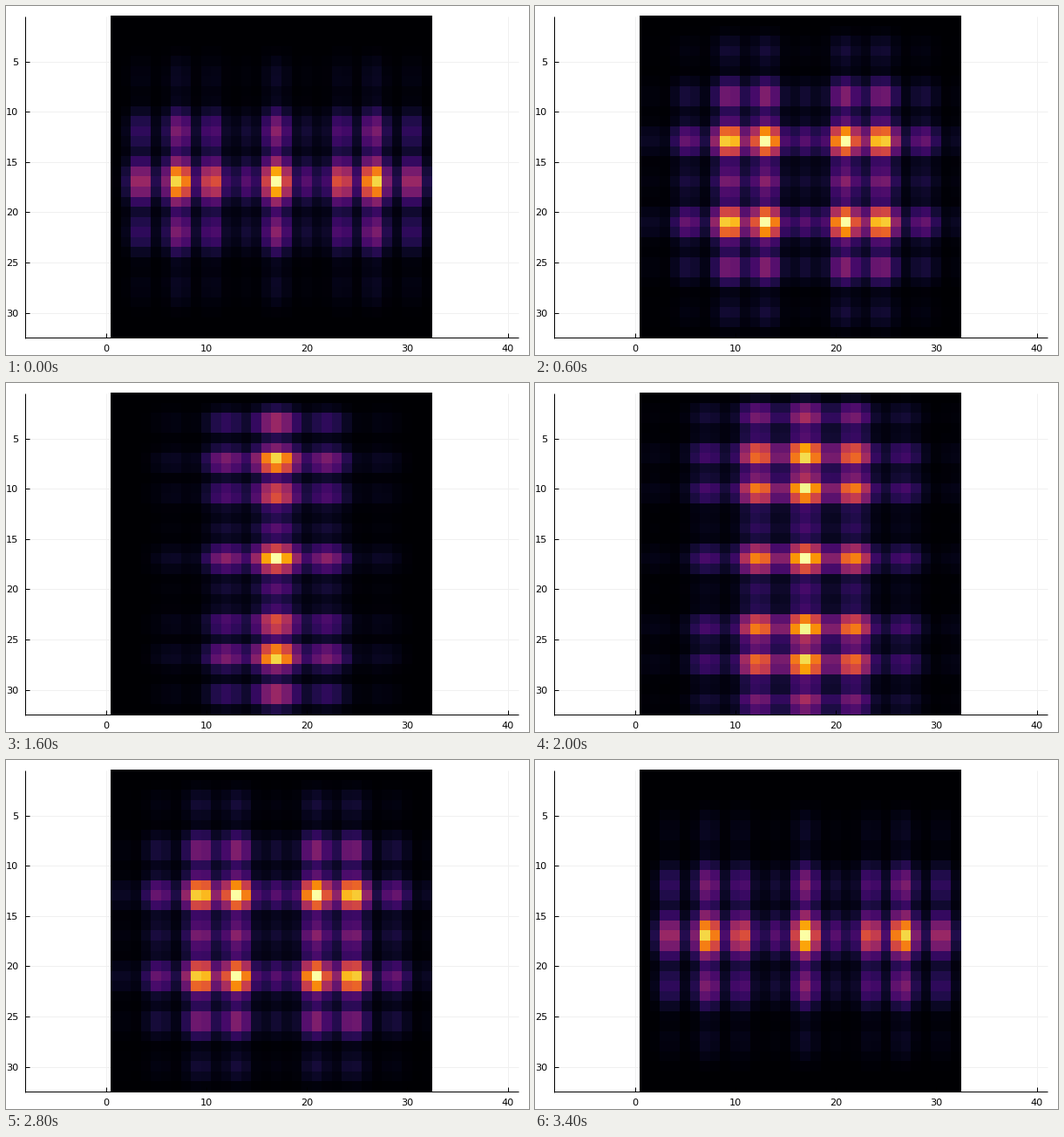
Animation, 600 px wide and 400 px high, one loop 3.6 s. Source, as a matplotlib script:

```python
import numpy as np
import matplotlib.pyplot as plt
from matplotlib.animation import FuncAnimation

W, H, DPI = 600, 400, 100
N, STEPS = 32, 9
CELL = 11.52
LEFT, RIGHT, TOP, BOTTOM = 22, 588, 12, 380
ZERO_X, ZERO_Y = 114.7, 6.0

# Lobes of the 1D fringe profile at four stages: each row follows one lobe.
STAGES = [0, 3, 5, 8]
CENTRES = [[0, 0, 0, 0],
           [3.0, 3.9, 4.1, 5.0],
           [6.4, 7.55, 8.5, 10.4],
           [9.7, 11.7, 13.0, 16.0],
           [13.5, 15.5, 17.5, 21.0]]
HEIGHTS = [[-1, -0.25, 0.37, 1],
           [0.25, -1, -1, -0.38],
           [0.65, 0.95, 0.38, 0.07],
           [-0.95, -0.30, -0.10, 0],
           [0.48, 0.07, 0, 0]]
WIDTHS = [1.3, 1.55, 1.65, 2.1]

offset = np.abs(np.arange(N) - N // 2)


def profile(stage):
    width = np.interp(stage, STAGES, WIDTHS)
    power = np.zeros(N)
    for centres, heights in zip(CENTRES, HEIGHTS):
        c = np.interp(stage, STAGES, centres)
        h = np.interp(stage, STAGES, heights)
        power += (h * np.exp(-((offset - c) / width) ** 2)) ** 2
    return np.sqrt(power)


def pattern(stage):
    field = np.outer(profile(STAGES[-1] - stage), profile(stage))
    return field / field.max()


fig = plt.figure(figsize=(W / DPI, H / DPI), dpi=DPI, facecolor="white")
ax = fig.add_axes([0, 0, 1, 1])


def line(xs, ys, color="black", width=1.0, z=5):
    ax.plot(xs, ys, color=color, lw=width * 72 / DPI, zorder=z,
            solid_capstyle="butt")


def label(x, y, value, align):
    ax.text(x, y, str(value), ha=align, va="center_baseline",
            family="DejaVu Sans", size=11.2 * 72 / DPI)


for value in range(0, 41, 10):
    x = ZERO_X + value * CELL
    line([x, x], [TOP, BOTTOM], "#f0f0f0", z=1)
    line([x, x], [BOTTOM, BOTTOM - 5])
    label(x, 392, value, "center")

for value in range(5, 31, 5):
    y = ZERO_Y + value * CELL
    line([LEFT, RIGHT], [y, y], "#f0f0f0", z=1)
    line([LEFT, LEFT + 5], [y, y])
    label(14, y, value, "right")

line([LEFT, LEFT], [TOP, BOTTOM + 0.5])
line([LEFT - 0.5, RIGHT], [BOTTOM, BOTTOM])

x0 = ZERO_X + CELL / 2
image = ax.imshow(pattern(0), cmap="inferno", vmin=0, vmax=1,
                  interpolation="nearest", aspect="auto", zorder=2,
                  extent=(x0, x0 + N * CELL, BOTTOM + 0.4, TOP - 0.3))
ax.set_xlim(0, W)
ax.set_ylim(H, 0)
ax.axis("off")


def update(i):
    image.set_data(pattern(min(i, 2 * STEPS - 1 - i)))
    return [image]


anim = FuncAnimation(fig, update, frames=2 * STEPS, interval=200,
                     repeat=True, repeat_delay=0)
plt.show()
```
